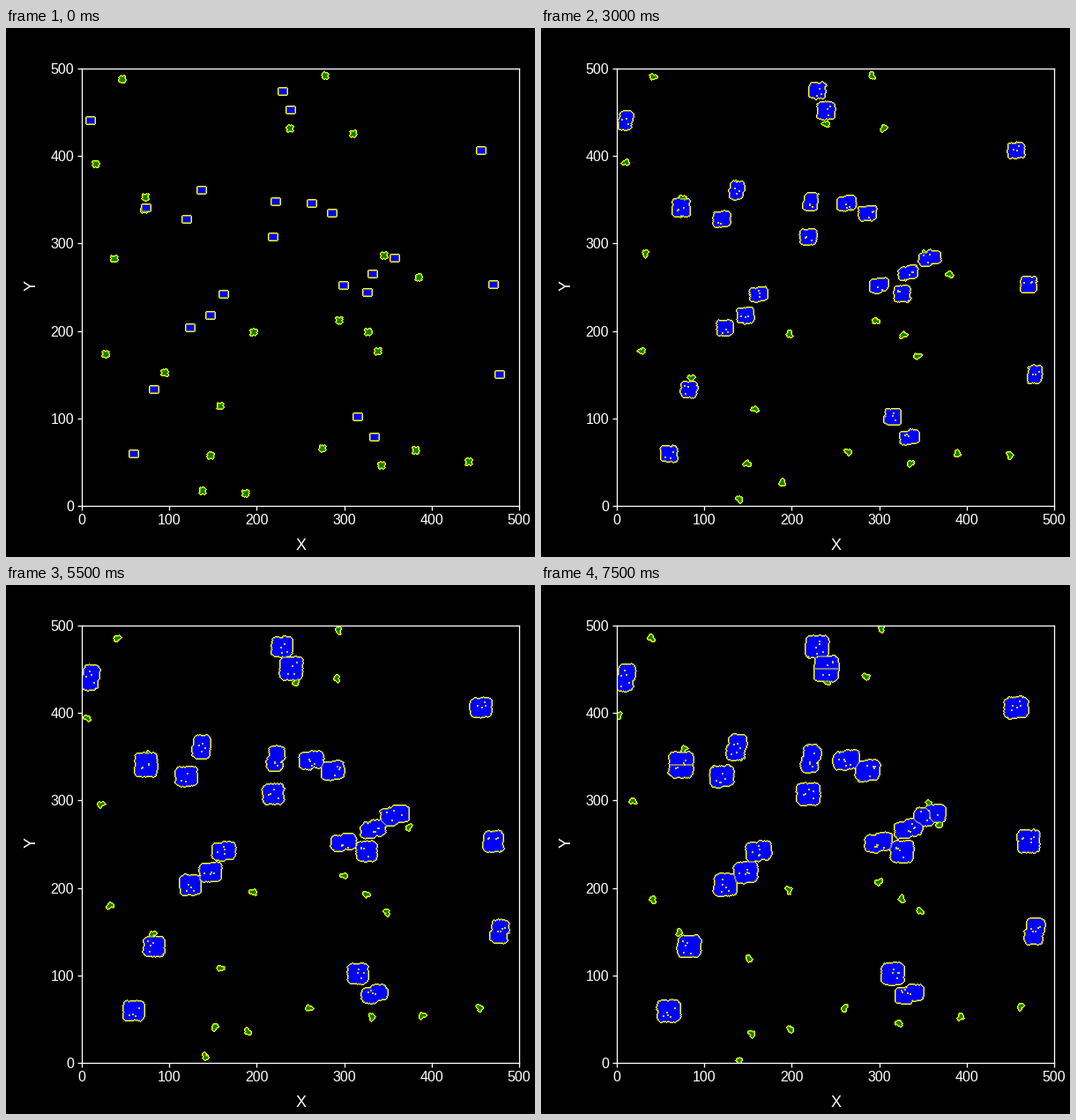
Animation, 600 px wide and 600 px high, one loop 8 s. Source, as a matplotlib script:

```python
import numpy as np
import matplotlib.pyplot as plt
from matplotlib.animation import FuncAnimation

FRAMES, STEP = 16, 500          # ms per step
LEFT, TOP, SIDE = 86, 46, 496   # plot area in stage pixels
PT = 0.72                       # points per pixel at 100 dpi
BLUE, GREEN, YELLOW = (0, 0, 255), (0, 128, 0), (255, 255, 0)
SEED_SIZE, AREA, SPACING = 9, 650, 27
SPLIT, DIVIDING = 6000, (2, 6, 11)   # when and which cells part

# Blue cells: start x, y and the width each grows to.
CELLS = np.array([
    (96, 105, 21), (314, 72, 26), (323, 93, 28), (539, 139, 27),
    (222, 184, 22), (205, 217, 27), (159, 204, 28), (306, 197, 21),
    (347, 199, 30), (370, 210, 28), (303, 237, 26), (441, 261, 36),
    (416, 279, 32), (410, 300, 26), (383, 292, 31), (247, 302, 29),
    (232, 326, 27), (209, 340, 26), (553, 291, 25), (560, 393, 22),
    (168, 410, 26), (145, 483, 26), (399, 441, 26), (418, 464, 32)], float)

# Green cells: where each walk begins and ends.
WALKS = np.array([
    (132, 58, 125, 60), (362, 54, 386, 49), (322, 114, 325, 109),
    (394, 120, 369, 104), (102, 154, 88, 148), (158, 192, 162, 186),
    (157, 206, 159, 210), (123, 262, 104, 245), (429, 258, 440, 248),
    (468, 283, 452, 272), (378, 332, 383, 337), (411, 345, 409, 356),
    (422, 367, 430, 370), (281, 345, 281, 346), (113, 370, 127, 357),
    (180, 391, 157, 394), (243, 429, 236, 424), (232, 485, 239, 509),
    (223, 525, 225, 540), (272, 528, 283, 504), (359, 477, 344, 480),
    (426, 496, 406, 497), (465, 479, 476, 490), (525, 492, 544, 478)], float)

X, Y = np.meshgrid(np.arange(SIDE) + LEFT + 0.5, np.arange(SIDE) + TOP + 0.5)
seeded = np.random.default_rng(5)
DOTS = seeded.uniform(-0.3, 0.3, (len(CELLS), 5, 2))


def wander(ends):
    """Random walk tied to its first and last point."""
    u = np.linspace(0, 1, FRAMES)[:, None]
    drift = np.cumsum(seeded.normal(0, 2, (FRAMES, 2)), axis=0)
    drift -= drift[0] + u * (drift[-1] - drift[0])
    return ends[:2] + u * (ends[2:] - ends[:2]) + drift


def crowding(pos):
    """Shift that eases each cell away from neighbours standing too close."""
    gap = pos[:, None] - pos[None]
    dist = np.hypot(gap[..., 0], gap[..., 1]) + 1e-9
    push = np.maximum(SPACING - dist, 0) / 2 / dist
    return (gap * push[..., None]).sum(axis=1)


PATHS = [wander(w) for w in WALKS]
PUSH = crowding(CELLS[:, :2])


def window(x, y, reach):
    """Slices of the grid around a point."""
    def span(v, origin):
        lo = int(v - origin)
        return slice(max(lo - reach, 0), max(lo + reach + 1, 0))
    return span(y, TOP), span(x, LEFT)


def depth(cx, cy, hw, hh, radius, win):
    """Distance inside a rounded box, positive within."""
    qx = np.abs(X[win] - cx) - hw + radius
    qy = np.abs(Y[win] - cy) - hh + radius
    outer = np.hypot(np.maximum(qx, 0), np.maximum(qy, 0))
    return radius - outer - np.minimum(np.maximum(qx, qy), 0)


def lobes(x, y, w, h):
    """Two overlapping boxes along the longer side, leaning up to the right."""
    lean = 0.15 * abs(w - h)
    for side in (-1, 1):
        if w >= h:
            yield x + side * 0.18 * w, y - side * lean, 0.32 * w, (h - lean) / 2
        else:
            yield x + side * lean, y - side * 0.18 * h, (w - lean) / 2, 0.32 * h


def blob(x, y, i, rng):
    """Ragged little shape, squarish at first."""
    win = window(x, y, 7)
    dx, dy = X[win] - x, Y[win] - y
    angle = np.arctan2(dy, dx)
    a, b = rng.uniform(0, 2 * np.pi, 2)
    if i == 0:
        r = 3.9 - 0.6 * np.cos(4 * angle) + 0.3 * np.cos(5 * angle + a)
    else:
        r = 3.4 + 0.7 * np.cos(2 * angle + a) + 0.7 * np.cos(3 * angle + b)
    return win, np.hypot(dx, dy) < r + rng.uniform(-0.5, 0.5, r.shape)


def blend(rgb, mask, share):
    rgb[mask] = rgb[mask] * (1 - share) + np.array(YELLOW) * share


def picture(i):
    t = i * STEP
    rng = np.random.default_rng(100 + i)
    grown = 1 - (1 - t / 8000) ** 1.7
    label = np.zeros((SIDE, SIDE), int)
    best = np.zeros((SIDE, SIDE))
    dots = np.zeros((SIDE, SIDE), bool)

    for n, path in enumerate(PATHS):
        win, mask = blob(*path[i], i, rng)
        label[win][mask] = -1 - n

    coarse = rng.uniform(-1, 1, (SIDE // 4, SIDE // 4))
    rough = np.kron(coarse, np.ones((4, 4))) + rng.uniform(-0.4, 0.4, best.shape)
    rough *= 0.7 * min(1, 2 * grown)
    for n, (x, y, width) in enumerate(CELLS):
        x, y = (x, y) + grown * PUSH[n]
        area = AREA * (1.25 if n in DIVIDING else 1)
        w, h = (SEED_SIZE + grown * (end - SEED_SIZE)
                for end in (width, area / width))
        win = window(x, y, 24)
        for k, lobe in enumerate(lobes(x, y, w, h)):
            d = depth(*lobe, 1 + 5 * grown, win) + rough[win]
            mask = d > best[win]
            best[win][mask] = d[mask]
            parted = n in DIVIDING and t >= SPLIT
            label[win][mask] = 2 * n + 1 + k * parted
        for u, v in DOTS[n, :int(5.5 * grown)]:
            px, py = int(x + u * w - LEFT), int(y + v * h - TOP)
            dots[max(py, 0):py + 2, max(px, 0):px + 2] = True

    edge = np.zeros(label.shape, bool)
    across = label[:, 1:] != label[:, :-1]
    down = label[1:] != label[:-1]
    edge[:, 1:] |= across
    edge[:, :-1] |= across
    edge[1:] |= down
    edge[:-1] |= down

    rgb = np.zeros((SIDE, SIDE, 3))
    rgb[label > 0] = BLUE
    rgb[label < 0] = GREEN
    blend(rgb, dots & (label > 0), 0.8)
    blend(rgb, edge & (label != 0), 0.5)
    blend(rgb, edge & (label == 0), 1)
    return rgb.astype(np.uint8)


plt.rcParams["font.family"] = "Liberation Sans"
fig = plt.figure(figsize=(6, 6), dpi=100, facecolor="black")
ax = fig.add_axes([LEFT / 600, (600 - TOP - SIDE) / 600, SIDE / 600, SIDE / 600],
                  facecolor="black")
image = ax.imshow(picture(0), extent=(0, 500, 0, 500), interpolation="nearest")
ax.set_xticks(range(0, 501, 100))
ax.set_yticks(range(0, 501, 100))
ax.tick_params(colors="white", labelsize=16 * PT, length=5 * PT, width=1.3 * PT,
               pad=4 * PT)
for spine in ax.spines.values():
    spine.set(color="white", linewidth=1.3 * PT)
label_style = dict(color="white", fontsize=18 * PT, ha="center", va="center")
fig.text(334.5 / 600, 12 / 600, "X", **label_style)
fig.text(29 / 600, 308 / 600, "Y", rotation=90, **label_style)


def update(i):
    image.set_data(picture(i))
    return [image]


anim = FuncAnimation(fig, update, frames=FRAMES, interval=STEP, repeat=True,
                     repeat_delay=0, blit=False)
plt.show()
```
